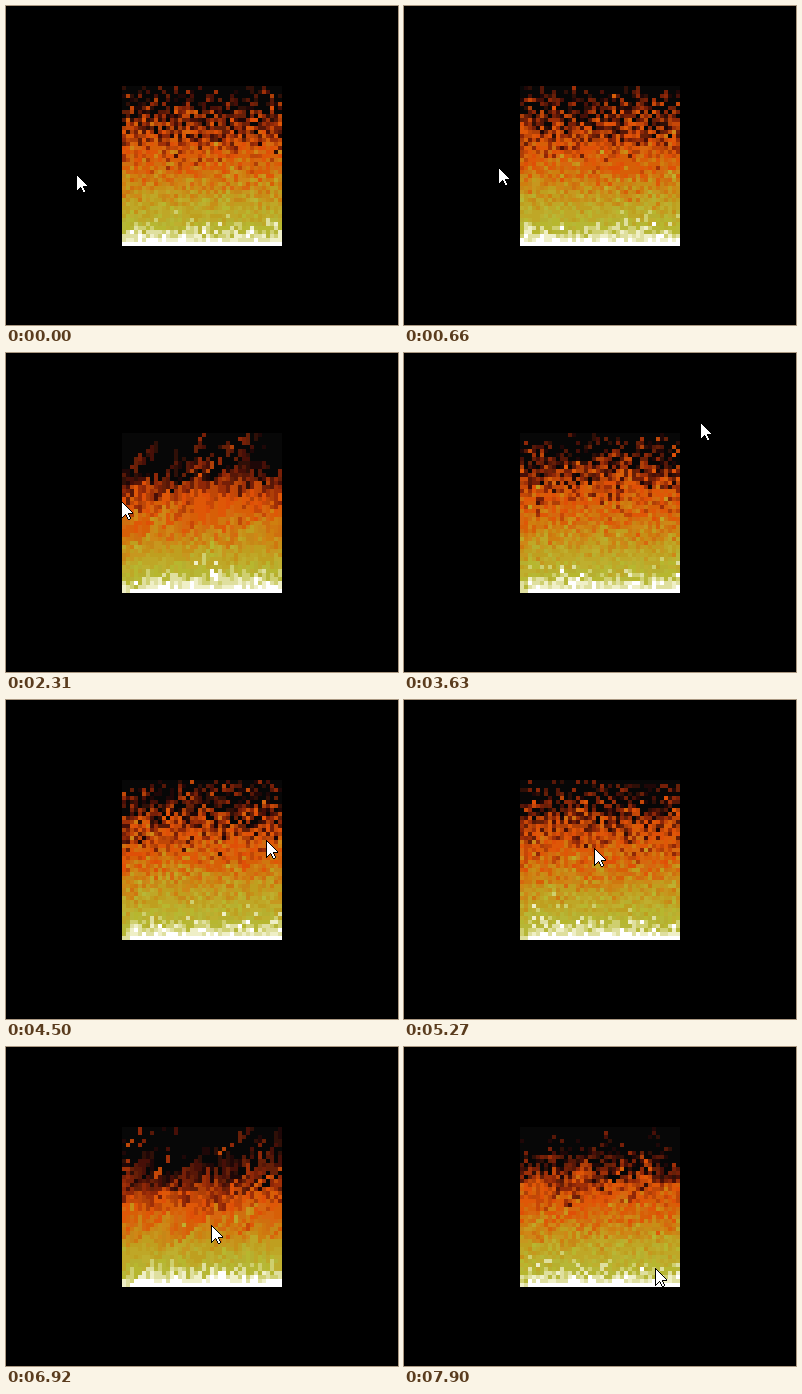
An HTML page with a canvas for the animation above (8 s loop, 392 px wide and 319 px high).

```html
<!DOCTYPE html>
<html lang="en">
<head>
<meta charset="utf-8">
<title>Pixel fire</title>
<style>
  html, body { margin: 0; width: 100%; height: 100%; overflow: hidden; background: #000; }
  canvas { display: block; }
</style>
</head>
<body>
<canvas id="stage" width="392" height="319"></canvas>
<script>
const ctx = document.getElementById('stage').getContext('2d');

const LOOP = 8000, FRAMES = 73, TICK = 110, STEPS = 2;
const SIZE = 40, CELL = 4, LEFT = 116, TOP = 80;

// Heat colours from cold to hot
const palette = (
  '070707 1f0707 2f0f07 470f07 571707 671f07 771f07 8f2707 9f2f07 af3f07 ' +
  'bf4707 c74707 df4f07 df5707 df5707 d75f07 d75f07 d7670f cf6f0f cf770f ' +
  'cf7f0f cf8717 c78717 c78f17 c7971f bf9f1f bf9f1f bfa727 bfa727 bfaf2f ' +
  'b7af2f b7b72f b7b737 cfcf6f dfdf9f efefc7 ffffff'
).split(' ').map(c => '#' + c);

// Periods [start, end] in ms when the wind blows to the right
const gusts = [[930, 2330], [5330, 7480]];

// Pointer tip: time, x, y
const pointerPath = [
  [0, 70, 168], [880, 102, 158], [1430, 129, 151], [1870, 124, 150],
  [2310, 115, 148], [2640, 89, 140], [2750, 87, 130], [3080, 150, 66],
  [3300, 215, 51], [3520, 278, 58], [3630, 296, 69], [3740, 302, 74],
  [4390, 275, 128], [4500, 260, 140], [5270, 190, 148], [6040, 150, 152],
  [7000, 210, 180], [7900, 251, 221]
];

function seeded(seed) {
  return () => {
    seed = (seed + 0x6D2B79F5) | 0;
    let v = Math.imul(seed ^ (seed >>> 15), 1 | seed);
    v = (v + Math.imul(v ^ (v >>> 7), 61 | v)) ^ v;
    return ((v ^ (v >>> 14)) >>> 0) / 4294967296;
  };
}

function spread(heat, windy, random) {
  for (let x = 0; x < SIZE; x++) {
    for (let y = 0; y < SIZE - 1; y++) {
      const i = y * SIZE + x;
      const decay = Math.floor(random() * 3);
      heat[windy ? i + decay : i] = Math.max(0, heat[i + SIZE] - decay);
    }
  }
}

function burn() {
  const random = seeded(1973);
  const heat = new Uint8Array(SIZE * SIZE);
  heat.fill(palette.length - 1, SIZE * (SIZE - 1));
  for (let i = 0; i < 120; i++) spread(heat, false, random);
  const frames = [];
  for (let f = 0; f < FRAMES; f++) {
    frames.push(heat.slice());
    for (let s = 0; s < STEPS; s++) {
      const t = (f + s / STEPS) * TICK;
      spread(heat, gusts.some(([a, b]) => t >= a && t < b), random);
    }
  }
  return frames;
}

function pointerAt(t) {
  const n = pointerPath.findIndex(p => p[0] > t);
  if (n < 0) return pointerPath[pointerPath.length - 1].slice(1);
  const a = pointerPath[n - 1], b = pointerPath[n];
  const k = (t - a[0]) / (b[0] - a[0]);
  return [1, 2].map(j => Math.round(a[j] + (b[j] - a[j]) * k));
}

function drawPointer(px, py) {
  const run = (color, x, y, w, h = 1) => {
    ctx.fillStyle = color;
    ctx.fillRect(px + x, py + y, w, h);
  };
  const black = (...r) => run('#000', ...r);
  const white = (...r) => run('#fff', ...r);
  for (let r = 0; r < 12; r++) {
    black(0, r, r + 1);
    if (r > 1) white(1, r, r - 1);
  }
  // Lower edge of the head
  black(0, 12, 12);
  white(1, 12, 6);
  black(0, 13, 8);
  for (let r = 13; r < 18; r++) {
    black(0, r, 18 - r);
    if (r < 16) white(1, r, 16 - r);
  }
  // Tail
  white(5, 13, 2);
  black(5, 14, 4, 2);
  white(6, 14, 2, 2);
  black(6, 16, 4, 2);
  white(7, 16, 2, 2);
  black(7, 18, 2);
}

const frames = burn();

function frameAt(t) {
  // Two ticks are 10 ms shorter than the rest
  const shift = (t >= 4000 ? 10 : 0) + (t >= 7500 ? 10 : 0);
  return Math.min(FRAMES - 1, Math.floor((t + shift) / TICK));
}

function startOf(f) {
  return f * TICK - (f >= 40 ? 10 : 0) - (f >= 72 ? 10 : 0);
}

function draw(f) {
  ctx.fillStyle = '#000';
  ctx.fillRect(0, 0, 392, 319);
  frames[f].forEach((heat, i) => {
    ctx.fillStyle = palette[heat];
    ctx.fillRect(LEFT + (i % SIZE) * CELL, TOP + Math.floor(i / SIZE) * CELL, CELL, CELL);
  });
  drawPointer(...pointerAt(startOf(f)));
}

const begin = performance.now();
let shown = -1;

function update() {
  const f = frameAt((performance.now() - begin) % LOOP);
  if (f !== shown) draw(shown = f);
  requestAnimationFrame(update);
}
update();
</script>
</body>
</html>
```
